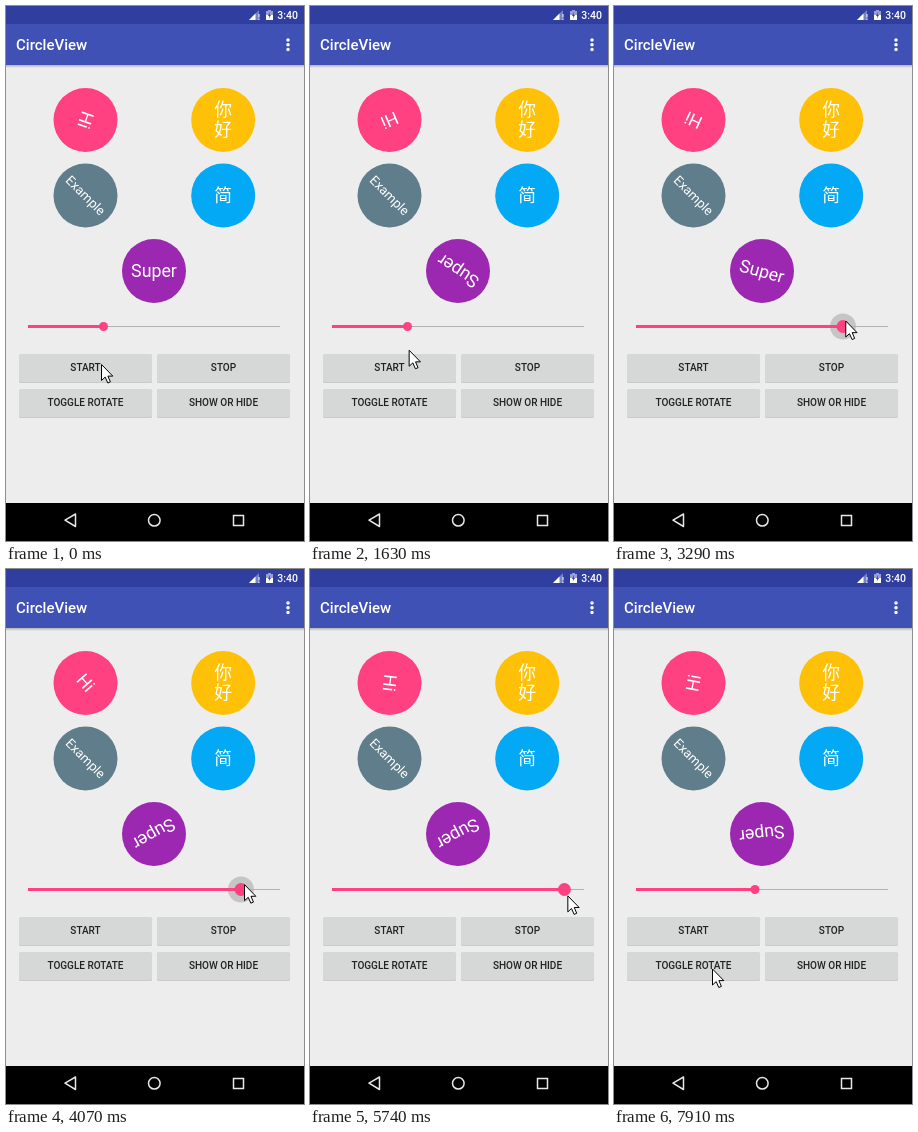
Recreate the animation shown at these times as an HTML page. Size 298x535 px, loop 8 s.

```html
<!DOCTYPE html>
<html lang="zh-CN">
<head>
<meta charset="utf-8">
<title>CircleView</title>
<style>
html, body { margin: 0; width: 100%; height: 100%; overflow: hidden; background: #ededed; }
svg { display: block; width: 100%; height: 100%; font-family: Roboto, "Noto Sans CJK SC", "Noto Sans CJK", sans-serif; }
.label { fill: #fff; font-size: 17.8px; text-anchor: middle; }
.small { font-size: 13px; }
.bold { font-weight: 500; fill: #fff; }
.key { font-weight: 500; font-size: 10px; fill: #212121; text-anchor: middle; }
</style>
</head>
<body>
<svg viewBox="0 0 298 535">
  <defs>
    <filter id="soft" x="-10%" y="-30%" width="120%" height="170%"><feGaussianBlur stdDeviation="1.2"/></filter>
    <linearGradient id="fade" x2="0" y2="1">
      <stop stop-color="#000" stop-opacity=".25"/><stop offset="1" stop-color="#000" stop-opacity="0"/>
    </linearGradient>
  </defs>
  <rect width="298" height="535" fill="#ededed"/>
  <rect y="59" width="298" height="3" fill="url(#fade)"/>
  <rect width="298" height="59" fill="#3f51b5"/>
  <rect width="298" height="18" fill="#303f9f"/>

  <path d="M253 4V14H243Z" fill="#fff" opacity=".35"/>
  <path d="M249.500 7.500V14H243Z" fill="#fff"/>
  <path d="M253 8V11.500M253 12.500V14" stroke="#fff"/>
  <path d="M260 5H262V4H265V5H267V14H260Z" fill="#fff" opacity=".5"/>
  <path d="M260 9H267V14H260Z" fill="#fff"/>
  <path d="M264 6L262 10H263.300L262.800 12.500L265 9H263.700Z" fill="#303f9f"/>
  <text class="bold" x="292" y="13" font-size="10.500" text-anchor="end">3:40</text>
  <text class="bold" x="10" y="44" font-size="15">CircleView</text>
  <path d="M282 34V43.500" stroke="#fff" stroke-width="3.500" stroke-linecap="round" stroke-dasharray="0 4.700"/>

  <g id="discs"></g>
  <g class="label">
    <text id="hi" y="6">Hi</text>
    <text x="217.200" y="110">你</text>
    <text x="217.200" y="130">好</text>
    <text class="small" y="4.400" transform="translate(79.500 189.500) rotate(45)">Example</text>
    <text x="217.200" y="196">简</text>
    <text id="super" y="6.200">Super</text>
  </g>

  <circle id="halo" cy="320.500" r="13" opacity=".17"/>
  <path d="M22 320.500H274" stroke="#b2b2b2"/>
  <path id="bar" stroke="#ff4081" stroke-width="3"/>
  <circle id="thumb" cy="320.500" fill="#ff4081"/>

  <g id="keys"></g>

  <rect y="497" width="298" height="38"/>
  <g fill="none" stroke="#e8e8e8" stroke-width="1.500">
    <path d="M69.500 508V520.500L59 514.200Z" stroke-linejoin="round"/>
    <circle cx="148.300" cy="514.300" r="5.800"/>
    <rect x="227.500" y="509.500" width="10" height="10"/>
  </g>
  <path id="cursor" d="M0 0V16L3.700 12.600L6.300 18.500L8.900 17.400L6.400 11.600H11.300Z" fill="#fff" stroke="#000"/>
</svg>
<script>
const $ = id => document.getElementById(id);
const LOOP = 8000, BEAT = 136.5;
const SPIN = 1.257, LEFT = 22, SPAN = 252;
const GRAB = 2400, RELEASE = 7350, LAG = 110;

// Stops of the pointer: time, x, y; it eases from each to the next.
const stops = [[1400, 95.5, 358.5], [2000, 106, 317.5], [2330, 106, 317.5], [GRAB, 100, 318],
  [3125, 231.5, 315], [4700, 242, 316], [5800, 258, 327], [6080, 258, 327],
  [7134, 132, 319], [RELEASE, 143.5, 320], [7640, 192, 346], [7910, 98.5, 400]];

function pointer(t) {
  const n = stops.findIndex(s => s[0] > t);
  if (n < 1) return n ? stops.at(-1) : stops[0];
  const a = stops[n - 1], b = stops[n], u = (t - a[0]) / (b[0] - a[0]);
  return a.map((v, i) => v + (b[i] - v) * u * u * (3 - 2 * u));
}

// The thumb trails the pointer while it is dragged.
const thumbX = t => pointer(Math.min(RELEASE, Math.max(GRAB, t - LAG)))[1] - 2.5;

// The slider sets the speed, so the angle is the area under its path.
function turned(from, to) {
  const dt = (to - from) / 400;
  let sum = 0;
  for (let i = 0; i < 400; i++) sum += (thumbX(from + (i + 0.5) * dt) - LEFT) / SPAN;
  return sum * dt * SPIN;
}

$("discs").innerHTML = ["#ff4081", "#ffc107", "#607d8b", "#03a9f4", "#9c27b0"].map((color, i) =>
  `<circle cx="${i == 4 ? 148 : 79.5 + i % 2 * 137.7}" cy="${114 + (i >> 1) * 75.5}" r="32" fill="${color}"/>`).join("");

const box = (x, y, style) => `<rect x="${x}" y="${y}" width="133" height="28" rx="1.500" ${style}/>`;
$("keys").innerHTML = ["START", "STOP", "TOGGLE ROTATE", "SHOW OR HIDE"].map((name, i) => {
  const x = 13 + i % 2 * 138, y = 348 + (i >> 1) * 35;
  return (i ? "" : box(x, y + 1.5, 'id="lift" filter="url(#soft)" opacity=".28"')) +
    box(x, y + 0.8, 'opacity=".2"') + box(x, y, 'fill="#d6d7d7"') +
    `<text class="key" x="${x + 66.5}" y="${y + 17.3}">${name}</text>`;
}).join("");

const place = (id, x, y, angle = 0) =>
  $(id).setAttribute("transform", `translate(${x} ${y}) rotate(${angle})`);
const show = (id, on) => $(id).style.display = on ? "" : "none";

function draw() {
  // The screen refreshes in coarse beats.
  const now = (performance.now() - start) % LOOP;
  const t = Math.floor((now + 25) / BEAT) * BEAT;
  const x = thumbX(t), held = t > GRAB && t < RELEASE;
  const [, px, py] = pointer(t);
  place("hi", 79.5, 114, 109 + t * 0.249);
  place("super", 148, 265, t < 1100 ? 0 : turned(1070, t));
  place("cursor", px, py);
  $("bar").setAttribute("d", `M${LEFT} 320.500H${x}`);
  $("thumb").setAttribute("cx", x);
  $("thumb").setAttribute("r", held ? 6.5 : 4.5);
  $("halo").setAttribute("cx", x);
  show("halo", held && t < 4500);
  show("lift", t > 500 && t < 1300);
  requestAnimationFrame(draw);
}
const start = performance.now();
draw();
</script>
</body>
</html>
```
